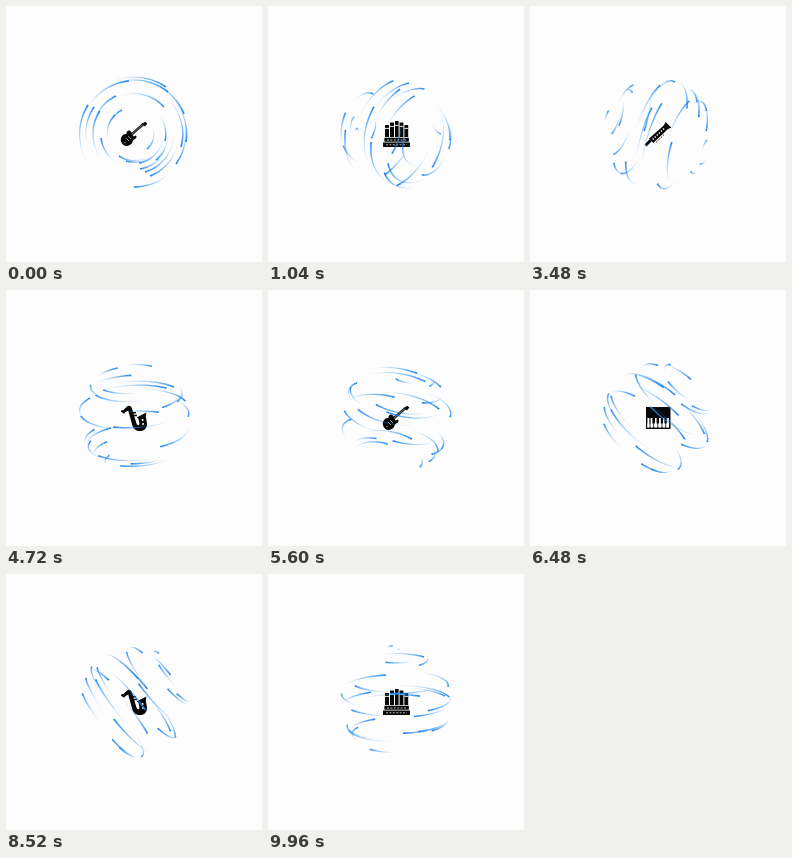
Recreate the animation shown at these times as an HTML page with a canvas. Size 256 by 256 pixels, loop 10 s.

```html
<!DOCTYPE html>
<html lang="en">
<head>
<meta charset="utf-8">
<title>Music loader</title>
<style>
  html, body { margin: 0; width: 100%; height: 100%; overflow: hidden; background: #fdfdfd; }
  svg, canvas { position: absolute; left: 0; top: 0; width: 256px; height: 256px; }
  svg g { visibility: hidden; }
  svg g.on { visibility: visible; }
</style>
</head>
<body>
<svg viewBox="0 0 256 256" fill="#080808">
  <g id="guitar">
    <path d="M126 128 137.5 118" stroke="#222" stroke-width="2.6"/>
    <path d="M126 128 137.5 118" stroke="#999" stroke-width=".6"/>
    <path d="M136 118 139.2 115.8 141.4 117.6 139 120.6Z"/>
    <path d="M125 125.4C123 123.2 120 125.4 120.4 128C117 127.6 114 131 115 135.2C116 139.6 121 141.4 124.6 138.6C127 136.6 126.4 134.4 128 133.4C130 132.8 131.4 131 129.8 129.4L127.6 130.4Z"/>
    <path d="M120.2 132.2 123 135M122.2 130.2 125 133" stroke="#bbb" stroke-width=".8"/>
    <circle cx="119" cy="136.6" r=".7" fill="#aaa"/>
  </g>
  <g id="piano">
    <path d="M116 117H140.5V139H116Z"/>
    <path d="M117.4 128H119.4V137.4H117.4ZM120.6 128H122.4V137.4H120.6ZM125 128H126.6V137.4H125ZM129 128H130.8V137.4H129ZM133 128H134.4V137.4H133ZM136.8 128H139V137.4H136.8Z" fill="#fff"/>
    <path d="M117.4 133.4H139V137.4H117.4Z" fill="#fff"/>
    <path d="M120 133V138M123.6 133V138M127.8 133V138M132 133V138M135.7 133V138" stroke="#080808" stroke-width=".8"/>
  </g>
  <g id="sax">
    <path d="M116 121.6 121 116.4C123.4 114.8 125.4 116 126 118.6L130.4 133.2C131.4 136 133.6 135.6 133.4 133.4L132.4 128.4 130.6 127.6 140.4 122.6 139.8 126.4 141 133.4C141.4 138 138 141.2 133.6 141C129.4 140.8 127.4 138.6 126.4 135.4L122.2 120.4 118.4 122.8Z"/>
    <path d="M115.4 120.6 118.6 123" stroke="#080808" stroke-width="2"/>
    <path d="M126.4 122.8H130M127.4 125.6H131" stroke="#080808" stroke-width="1.5"/>
    <circle cx="136.6" cy="130" r="1" fill="#fff"/>
    <circle cx="137" cy="134" r="1" fill="#fff"/>
  </g>
  <g id="clarinet">
    <path d="M114.6 138.4 119.6 133.2 121.6 135.2 116.6 140.6Z"/>
    <path d="M119 132.6 131.8 121.2C134 119.4 135 117.8 135.6 116L141.4 121.8C139 122.4 137.2 123.6 135.6 125.2L123.2 137Z"/>
    <path d="M122.6 133.4 134 122.6" stroke="#fff" stroke-width="1.4" stroke-dasharray="1.3 1.6"/>
    <path d="M126 136.4 134 128.6" stroke="#222" stroke-width="1" stroke-dasharray="2 1.2"/>
  </g>
  <g id="pipes">
    <path d="M117 119H121V131H117ZM122 116.4H126V131H122ZM127 115H130.6V131H127ZM131.6 116.4H135.4V131H131.6ZM136.4 119H140.2V131H136.4Z"/>
    <path d="M116.4 131.8H140.8V135.8H116.4ZM115 136.6H142V141H115Z"/>
    <path d="M117 122.4H121M122 120.4H126M127 119.4H130.6M131.6 120.4H135.4M136.4 122.4H140.2" stroke="#fff" stroke-width=".9"/>
    <path d="M119 134H138M118 138.8H139" stroke="#ddd" stroke-width=".8" stroke-dasharray="2 1.4"/>
  </g>
</svg>
<canvas width="256" height="256"></canvas>
<script>
const LOOP = 10000, TICK = 40, STEP = 20, LEAD = 600;
const CENTER = 128, RADIUS = 55, SPEED = 3.1, TRAIL = 20;
const ORDER = ['guitar', 'piano', 'sax', 'clarinet', 'pipes', 'clarinet', 'guitar', 'pipes'];

// Spin axis over time: [ms, x, y, z]
const AXES = [
  [-600, 0, 0, 1], [0, 0, 0, 1], [1700, 1, .25, .22], [2100, 1, .25, .22],
  [3480, .9, .3, .35], [4400, .05, 1, .4], [4720, .05, 1, .4],
  [6480, -.6, .7, .35], [8520, -.75, .6, .2], [9600, 0, 1, .3], [10000, 0, 1, .3]
];

// Screen offsets of the dots at time zero
const DOTS = [
  [34, -42], [32, -47], [30, -27], [52, 8], [47, 13], [42, 30], [50, -20],
  [0, 53], [16, 42], [11, 38], [6, 35], [5, 29], [-8, 27], [-15, 22], [22, 26],
  [-46, -29], [-40, -27], [-18, -38], [-34, -23], [-33, 4], [-12, -24],
  [-19, -19], [13, 15], [31, 7], [-5, -53]
];

const ctx = document.querySelector('canvas').getContext('2d');
const icons = [...document.querySelectorAll('svg g')];

function axisAt(t) {
  let i = 0;
  while (i < AXES.length - 2 && t >= AXES[i + 1][0]) i++;
  const [a, b] = [AXES[i], AXES[i + 1]];
  const u = (t - a[0]) / (b[0] - a[0]);
  const k = u * u * (3 - 2 * u);
  const v = [1, 2, 3].map(n => a[n] + (b[n] - a[n]) * k);
  const len = Math.hypot(...v);
  return v.map(n => n / len);
}

function rotate([x, y, z], [a, b, c], angle) {
  const co = Math.cos(angle), si = Math.sin(angle);
  const d = (a * x + b * y + c * z) * (1 - co);
  return [
    x * co + (b * z - c * y) * si + a * d,
    y * co + (c * x - a * z) * si + b * d,
    z * co + (a * y - b * x) * si + c * d
  ];
}

const paths = DOTS.map(([x, y], i) => {
  const z = Math.sqrt(Math.max(0, RADIUS * RADIUS - x * x - y * y)) * (i % 2 ? -1 : 1);
  let p = rotate([x, y, z], [0, 0, 1], -SPEED * LEAD / 1000);
  const path = [p];
  for (let t = -LEAD; t < LOOP; t += STEP) {
    p = rotate(p, axisAt(t + STEP / 2), SPEED * STEP / 1000);
    path.push(p);
  }
  return path;
});

function drawTrail(path, head, length) {
  for (let k = length; k > 0; k--) {
    const [x0, y0] = path[head - k], [x1, y1] = path[head - k + 1];
    const f = 1 - (k - 1) / length;
    ctx.strokeStyle = `rgba(${70 - 45 * f}, ${160 - 30 * f}, 238, ${.06 + .9 * f ** 1.3})`;
    ctx.lineWidth = .7 + .9 * f;
    ctx.beginPath();
    ctx.moveTo(CENTER + x0, CENTER + y0);
    ctx.lineTo(CENTER + x1, CENTER + y1);
    ctx.stroke();
  }
}

function frame(now) {
  const t = Math.floor((now % LOOP) / TICK) * TICK;
  const name = ORDER[Math.floor(t / 250) % ORDER.length];
  icons.forEach(g => g.classList.toggle('on', g.id === name));
  ctx.clearRect(0, 0, 256, 256);
  const head = (t + LEAD) / STEP;
  paths.forEach((path, i) => drawTrail(path, head, TRAIL - i * 5 % 9));
}

const start = performance.now();
function loop() {
  frame(performance.now() - start);
  requestAnimationFrame(loop);
}
loop();
</script>
</body>
</html>
```
